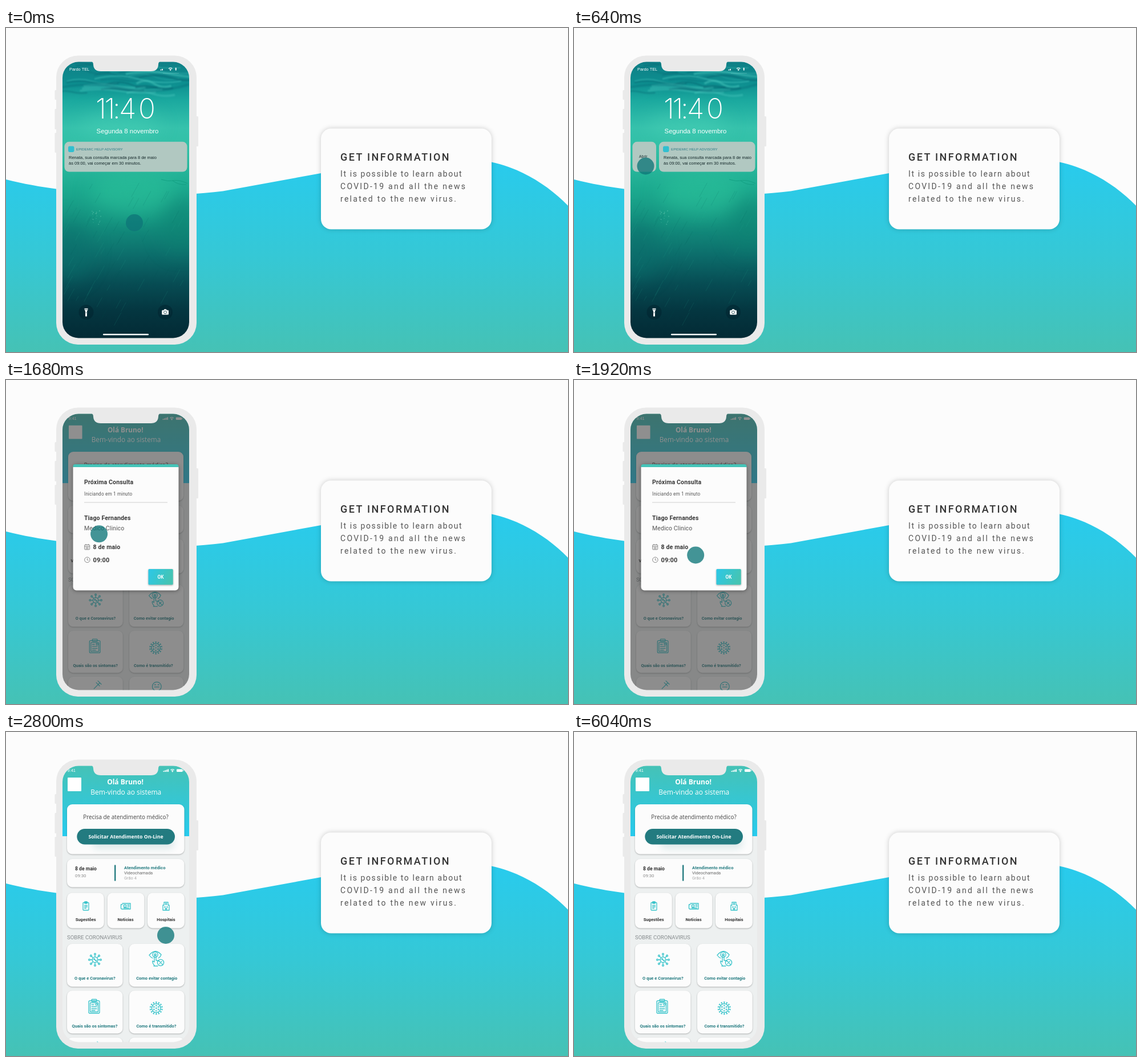
An HTML page that plays this animation: 985 by 569 pixels, repeating every 8080 ms.

```html
<!DOCTYPE html>
<html lang="pt">
<head>
<meta charset="utf-8">
<title>Get information</title>
<style>
  html, body { margin: 0; width: 100%; height: 100%; overflow: hidden; background: #fcfcfc; }
  svg { display: block; width: 985px; height: 569px; font-family: Roboto, sans-serif; }
  .ios { font-family: "Liberation Sans", Arial, sans-serif; }
  .open { font-family: "Open Sans", sans-serif; }
  .clock { font-family: Inter, sans-serif; font-weight: 200; }
  .mid { text-anchor: middle; }
  .b { font-weight: 700; }
  .m { font-weight: 500; }
  .card { fill: #fcfcfc; filter: drop-shadow(0 1px 1.2px rgba(0, 0, 0, .27)); }
  .icon { fill: none; stroke: #38c3ca; stroke-width: 1.3; stroke-linecap: round; stroke-linejoin: round; }
  .soft { filter: blur(1.3px); }
  .glow { filter: blur(16px); }
</style>
</head>
<body>
<svg id="stage" viewBox="0 0 985 569" xmlns="http://www.w3.org/2000/svg"></svg>
<script>
const LOOP = 8080, STEP = 40;
const TEAL = '#237b80';

const rect = (x, y, w, h, r, attrs = '') =>
  `<rect x="${x}" y="${y}" width="${w}" height="${h}" rx="${r}" ${attrs}/>`;
const circle = (x, y, r, attrs = '') => `<circle cx="${x}" cy="${y}" r="${r}" ${attrs}/>`;
const path = (d, attrs = '') => `<path d="${d}" ${attrs}/>`;
const text = (x, y, size, s, attrs = '') =>
  `<text x="${x}" y="${y}" font-size="${size}" ${attrs}>${s}</text>`;
const group = (body, attrs = '') => `<g ${attrs}>${body}</g>`;
const card = (x, y, w, h, r = 9) => rect(x, y, w, h, r, 'class="card"');
const many = (n, fn) => Array.from({ length: n }, (_, i) => fn(i)).join('');
const gradient = (id, dir, stops) =>
  `<linearGradient id="${id}" ${dir}>` +
  stops.map(([at, c]) => `<stop offset="${at}" stop-color="${c}"/>`).join('') + '</linearGradient>';
const DOWN = 'x1="0" y1="0" x2="0" y2="1"';

let seed = 11;
const rnd = () => (seed = seed * 16807 % 2147483647) / 2147483647;

const defs = `<defs>
  ${gradient('sea', 'gradientUnits="userSpaceOnUse" x1="0" y1="228" x2="0" y2="569"',
    [[0, '#28cbee'], [.5, '#35c8d6'], [1, '#45c2b5']])}
  ${gradient('head', 'gradientUnits="userSpaceOnUse" x1="0" y1="59" x2="0" y2="183"',
    [[0, '#45c2b6'], [1, '#27cbee']])}
  ${gradient('ok', 'x1="0" y1="0" x2="1" y2=".3"', [[0, '#2bc8e8'], [1, '#45c4b4']])}
  ${gradient('water', DOWN, [[0, '#0f7f86'], [.08, '#0d8f90'], [.14, '#1ba99f'], [.24, '#36c2ac'],
    [.33, '#2fbfa4'], [.46, '#1caa8f'], [.58, '#14927f'], [.7, '#0c6d6b'], [.8, '#074d54'],
    [.9, '#043640'], [1, '#032a35']])}
  <clipPath id="screen">${rect(99, 59.5, 222, 485, 28)}</clipPath>
</defs>`;

function wifi(x, y) {
  const arc = r => path(`M${x - r} ${y - r} A${r * 1.42} ${r * 1.42} 0 0 1 ${x + r} ${y - r}`);
  return group(arc(1.5) + arc(3.1), 'fill="none" stroke="#fff" stroke-width="1.2"') + circle(x, y - .4, .9, 'fill="#fff"');
}

const bars = (x, y, n) => many(n, i => rect(x + i * 2.6, y - 1.8 - i, 1.8, 1.8 + i, .4, 'fill="#fff"'));

function backdrop() {
  return rect(0, 0, 985, 569, 0, 'fill="#fcfcfc"') +
    path('M0 266 C60 281 120 288 200 293 C262 297 320 293 380 286.5 L552 255 ' +
      'C650 236 760 217 851 235.5 C905 247 952 278 985 312 V569 H0Z', 'fill="url(#sea)"') +
    rect(552, 176.5, 299, 177, 18,
      'fill="#fcfcfc" style="filter:drop-shadow(0 0 4px rgba(0,0,0,.2))"') +
    text(586, 233, 18, 'GET INFORMATION', 'class="m" fill="#333" letter-spacing="2.4"') +
    group(
      text(586, 261, 14, 'It is possible to learn about', 'letter-spacing="1.6"') +
      text(586, 283, 14, 'COVID-19 and all the news', 'letter-spacing="2.28"') +
      text(586, 304.5, 14, 'related to the new virus.', 'letter-spacing="2.28"'), 'fill="#555"');
}

const body = () => group(
  rect(85.5, 109, 5, 17, 1.5) + rect(85.5, 142, 5, 36, 1.5) + rect(85.5, 184, 5, 35, 1.5) +
  rect(332, 155, 5, 53, 1.5) + rect(88, 48.5, 246, 507.5, 38), 'fill="#eaeaea"');

const notch = () => path('M148 58 Q153 59 153 64 Q153.500 76 166 76 H254 Q266.500 76 267 64 Q267 59 272 58Z',
  'fill="#eaeaea"');

function wallpaper() {
  const ripples = many(26, i => {
    const y = 62 + i * 2.1, x = 90 + rnd() * 150, w = 50 + rnd() * 110, k = 3 + rnd() * 7;
    return path(`M${x} ${y} q${w * .25} ${-k} ${w * .5} 0 t${w * .5} ${k * .4}`,
      `stroke="${i % 2 ? '#45c4bb' : '#06636f'}" stroke-width="${1 + rnd() * 3}" opacity="${.25 + rnd() * .35}"`);
  });
  const rays = many(90, () => {
    const x = 95 + rnd() * 225, y = 270 + rnd() * 230, l = 8 + rnd() * 20;
    return path(`M${x} ${y} l${-l * .55} ${l}`, `stroke="${rnd() < .5 ? '#2fb59b' : '#06585a'}" opacity=".15"`);
  });
  const bubbles = many(16, () =>
    circle(150 + rnd() * 17, 315 + rnd() * 34, .5 + rnd() * .6, 'fill="#7fdcc4" opacity=".4"'));
  return rect(99, 59, 222, 486, 0, 'fill="url(#water)"') +
    group('<ellipse cx="225" cy="290" rx="75" ry="38" fill="#2cc39c" opacity=".55"/>' +
      '<ellipse cx="305" cy="345" rx="35" ry="50" fill="#0d8272" opacity=".5"/>' +
      '<ellipse cx="112" cy="390" rx="38" ry="55" fill="#0a6f6c" opacity=".5"/>' +
      '<ellipse cx="200" cy="170" rx="70" ry="24" fill="#4ed4ba" opacity=".4"/>', 'class="glow"') +
    group(ripples + path('M99 104 Q150 94 205 106 T321 99', 'stroke="#076f78" stroke-width="4" opacity=".4"'),
      'class="soft" fill="none"') +
    group(rays, 'fill="none"') + bubbles +
    path('M272 266 q12 4 22 2 t24 5 M292 268 q10 8 24 7', 'fill="none" stroke="#0f9a7c" opacity=".7"');
}

function lockScreen() {
  const torch = circle(140.5, 499, 13, 'fill="#021c26" opacity=".35"') +
    path('M137.500 492.500 h6 v2 l-1.500 3 v9 h-3 v-9 l-1.500 -3z', 'fill="#fff"') +
    path('M137.500 494.500 h6 M140.500 499 v2', 'stroke="#0a3a42" stroke-width=".7"');
  const camera = circle(279, 499, 13, 'fill="#021c26" opacity=".35"') +
    path('M274.500 495.500 h2 l1 -1.700 h3.200 l1 1.700 h2 q1.300 0 1.300 1.300 v5.500 q0 1.300 -1.300 1.300 h-9.200 ' +
      'q-1.300 0 -1.300 -1.300 v-5.500 q0 -1.300 1.300 -1.300z', 'fill="#fff"') +
    circle(279, 499.3, 2.5, 'fill="none" stroke="#0a3a42" stroke-width=".8"');
  const note = rect(109, 207.5, 10.5, 10.5, 2.4, 'fill="#31bfd0"') +
    text(123, 215, 6.25, 'EPIDEMIC HELP ADVISORY', 'fill="#2c7a85"') +
    group(text(110, 230.3, 7.5, 'Renata, sua consulta marcada para 8 de maio') +
      text(110, 240.3, 7.5, 'às 09:00, vai começar em 30 minutos.'), 'fill="#15282a"');
  return group(wallpaper() +
    text(111, 75, 7.4, 'Pardo TEL', 'fill="#fff"') +
    bars(270.5, 74.5, 2) + wifi(288.2, 74.6) + rect(296.8, 69.7, 1.8, 4.8, .6, 'fill="#fff"') +
    path('M275 79.500 H303', 'stroke="#7fd0cc" stroke-width=".6" opacity=".6"') +
    text('157 172.500 187 198 232', 158.5, 49.5, '11:40', 'class="clock" fill="#fff"') +
    text(213, 185, 11.4, 'Segunda 8 novembro', 'class="mid" fill="#fff"') +
    group(rect(102.5, 199.8, 0, 52.7, 8, 'id="tile"') + rect(102.5, 199.8, 215, 52.7, 8, 'id="note"'),
      'fill="#b1c8c1"') +
    text(121, 228.3, 6.8, 'Abrir', 'id="open" class="mid" fill="#1d3436"') +
    group(note, 'id="noteBody"') + torch + camera +
    rect(170, 537, 80, 2.6, 1.3, 'fill="#fff"'), 'id="lock" class="ios"');
}

function virus(x, y) {
  const spikes = many(8, i => group(
    path('M0 -5 V-8.500') + circle(0, -10, 1.4), `transform="rotate(${i * 45})"`));
  return group(spikes + circle(0, 0, 4.8) + circle(-1.3, -1, 1) + circle(1.5, 1.2, .8),
    `class="icon" transform="translate(${x} ${y})"`);
}

function germ(x, y) {
  const nubs = many(14, i => path('M0 -8.200 V-10.800 M-.8 -10.800 H.8', `transform="rotate(${i * 360 / 14})"`));
  const dots = many(7, i => circle(0, i ? -4.6 : 0, 1, `transform="rotate(${i * 60})"`));
  return group(nubs + circle(0, 0, 7.8) + group(dots, 'stroke-width="1"'),
    `class="icon" transform="translate(${x} ${y})"`);
}

const touchEye = () => group(
  path('M251 392 Q261 379 272 391 M252 393 Q254 396 257 397 M272 391 Q270 396 267 397') +
  circle(261.5, 391, 4.6) + circle(261.5, 391, 1.7) +
  path('M260 410 q-4 -5 -3 -8 l3 2 v-11 q1.500 -2 3 0 v8 l5 1 M259 411 h7') +
  circle(271, 405, 5.6) + path('M267.500 401.500 l7 7 M269 407 l4 -4'), 'class="icon" stroke-width="1.1"');

const board = () => group(
  rect(145, 472, 19, 22, 2) + rect(150, 469.5, 9, 4, 1) + rect(147.5, 475.5, 14, 16, .5) +
  path('M150 479 h4 M150 482.500 h9 M150 486 h9 M150 489 h6') + circle(158.5, 478.5, 1.6), 'class="icon" stroke-width="1.1"');

const menuIcons = () => group(
  rect(135, 299.5, 10, 13.5, 1) + rect(137.8, 298, 4.4, 3, .6, 'fill="#38c3ca"') + path('M137.500 304.500 h5 M137.500 307 h5 M137.500 309.500 h3') +
  path('M204 301 h14 v10 h-14.500 q-2 0 -2 -2 v-6 h2.500') + rect(206.5, 303.5, 4, 4, 0) +
  path('M213 303.500 h3 M213 306 h3 M206.500 309 h9') +
  path('M275 313 v-9 h2 v-5 h7 v5 h2 v9z M280.500 300.500 v3 M279 302 h3 M279.500 313 v-3 h2 v3') +
  path('M278 306.500 h1 M282 306.500 h1 M278 308.500 h1 M282 308.500 h1'), 'class="icon"');

// The lower part sits a little higher behind the dialog.
function home({ titleDy = 0, rowDy = 0, labelDx = 0 } = {}) {
  const bold = (x, y, size, s, fill = '#333') => text(x, y, size, s, `class="b mid" fill="${fill}"`);
  const rows = many(3, i => card(107, 372 + i * 82.3, 97.5, 75.2) + card(216, 372 + i * 82.3, 96.7, 75.2));
  const header = rect(90, 50, 240, 133, 0, 'fill="url(#head)"') +
    text(107.5, 69.5, 7.4, '9:41', 'class="ios" fill="#fff"') +
    bars(275.5, 70, 4) + wifi(291.7, 70) +
    rect(299, 65.3, 10.5, 4.8, 1.3, 'fill="#fff"') + rect(310, 66.8, .9, 2, .4, 'fill="#fff"') +
    rect(108, 80, 24, 24, 1, 'fill="#fff"') +
    group(text(209, 92, 12, 'Olá Bruno!', 'class="b"') +
      text(210.3, 109.6, 12, 'Bem-vindo ao sistema'), 'class="open mid" fill="#fff"');
  const ask = card(107, 127, 205.5, 87.5) +
    rect(150, 182, 146, 24, 12, `fill="${TEAL}" opacity=".13" style="filter:blur(6px)"`) +
    rect(124.3, 170, 171.7, 27.5, 13.7, `fill="${TEAL}"`) +
    group(text(210, 153.2, 9.9, 'Precisa de atendimento médico?', 'fill="#444"') +
      text(210, 186.6, 8.7, 'Solicitar Atendimento On-Line', 'class="b" fill="#fff"'), 'class="open mid"');
  const next = card(107, 223, 205.5, 49.5) +
    text(121, 243, 8.6, '8 de maio', 'class="b" fill="#333"') +
    text(121, 254.5, 7.8, '09:30', 'fill="#888"') +
    rect(190, 233.5, 2.4, 28, .5, `fill="${TEAL}"`) +
    text(207, 241, 7.6, 'Atendimento médico', `class="b" fill="${TEAL}" letter-spacing=".08"`) +
    text(207, 250, 7.5, 'Videochamada', 'fill="#666"') +
    text(207, 258.7, 7.5, 'Grão 4', 'fill="#aaa"');
  const menu = [107, 177.7, 248].map(x => card(x, 282.5, 64.8, 62)).join('') + menuIcons() +
    bold(139.7, 331.8, 7.6, 'Sugestões') + bold(209.5, 331.8, 7.6, 'Noticias') + bold(280.5, 331.8, 7.6, 'Hospitais');
  const topics = rows + virus(156, 400) + touchEye() + board() + germ(263.3, 485) +
    bold(155.8, 434.6, 7.5, 'O que e Coronavirus?', TEAL) +
    bold(264.2 + labelDx, 434.6, 7.5, 'Como evitar contagio', TEAL) +
    bold(155.5, 518.8, 7.5, 'Quais são os sintomas?', TEAL) +
    bold(263.5 + labelDx, 518.8, 7.5, 'Como é transmitido?', TEAL) +
    group(path('M153 558 l10 -10 M157 547 l6 6 M160 544 l6 6') + circle(265, 554, 8) +
      path('M261 551 h2 M267 551 h2 M261 555 h8'), 'class="icon"');
  return rect(90, 50, 240, 510, 0, 'fill="#edf0f0"') + header + ask + next + menu +
    group(text(107, 364, 9.6, 'SOBRE CORONAVIRUS', 'fill="#858a8c"'), `transform="translate(0 ${titleDy})"`) +
    group(topics, `transform="translate(0 ${rowDy})"`);
}

function dialog() {
  const calendar = rect(137.7, 289.3, 9, 8.5, 1) + path('M137.700 292 h9 M140 288 v2 M144.400 288 v2 M139.700 294 h5 M139.700 296 h5');
  const watch = circle(142.4, 315.8, 4.7) + path('M142.400 313 v3 l2 1');
  const bold = (x, y, s, size = 10.6) => text(x, y, size, s, 'class="b" fill="#3a3a3a" letter-spacing=".12"');
  return group(home({ titleDy: -4.6, rowDy: -7.7, labelDx: -4.5 }) +
      text(111.5, 324.5, 7.6, 'V', 'class="b" fill="#333"'),
      'transform="translate(3.8 1.2) scale(.983)"') +
    rect(90, 50, 240, 510, 0, 'fill="#383838" opacity=".56"') +
    rect(117.5, 148, 185, 221.5, 6, 'fill="#fcfcfc" style="filter:drop-shadow(0 1px 3px rgba(0,0,0,.4))"') +
    path('M117.500 153 v-1 q0 -4 4 -4 h177 q4 0 4 4 v1z', 'fill="#45c4b8"') +
    bold(137, 183, 'Próxima Consulta') +
    text(137, 203.4, 8.2, 'Iniciando em 1 minuto', 'fill="#555" letter-spacing=".16"') +
    path('M137 215 H283', 'stroke="#cfcfcf"') +
    bold(137, 245.6, 'Tiago Fernandes') +
    text(137, 263.5, 10.5, 'Medico Clinico', 'fill="#555" letter-spacing=".08"') +
    bold(152.5, 297, '8 de maio') + bold(152.5, 319.8, '09:00', 11) +
    group(calendar + watch, 'fill="none" stroke="#858585"') +
    rect(249.5, 332, 43.2, 27.5, 1.5, 'fill="url(#ok)" style="filter:drop-shadow(0 1px 1.5px rgba(0,0,0,.35))"') +
    text(271, 348.8, 8.2, 'OK', 'class="b mid" fill="#fff"');
}

const stage = document.getElementById('stage');
stage.innerHTML = defs + backdrop() + body() +
  group(lockScreen() + group(dialog(), 'id="dialog"') + group(home(), 'id="home"'), 'clip-path="url(#screen)"') +
  notch() + circle(0, 0, 15, 'id="touch" fill="#0e7678"');

const el = id => document.getElementById(id);
const parts = Object.fromEntries(
  ['lock', 'dialog', 'home', 'tile', 'note', 'open', 'noteBody', 'touch'].map(id => [id, el(id)]));
const ramp = (t, a, b) => Math.min(1, Math.max(0, (t - a) / (b - a)));
const mix = (a, b, p) => a + (b - a) * p;
const show = (node, on) => node.setAttribute('display', on ? 'inline' : 'none');

function draw(ms) {
  const t = Math.floor((ms % LOOP + .5) / STEP) * STEP;
  show(parts.lock, t < 1240);
  show(parts.dialog, t >= 1240 && t < 2800);
  show(parts.home, t >= 2800);

  const slide = ramp(t, 0, 640), left = 46.5 * slide;
  const tileW = Math.max(0, left - 5);
  parts.note.setAttribute('x', 102.5 + left);
  parts.note.setAttribute('width', 215 - left);
  parts.noteBody.setAttribute('transform', `translate(${47 * slide} 0)`);
  parts.tile.setAttribute('width', tileW);
  parts.open.setAttribute('x', 100.5 + tileW / 2);
  parts.open.setAttribute('opacity', ramp(slide, .4, 1));

  const go = ramp(t, 1500, 2240);
  const x = mix(mix(225, 125.5, slide), 280, go);
  const y = mix(mix(342, 242.5, slide), 357, go);
  parts.touch.setAttribute('transform', `translate(${x} ${y})`);
  parts.touch.setAttribute('opacity', .78 * (1 - ramp(t, 2880, 3280)));
}

const start = performance.now();
function tick() {
  draw(performance.now() - start);
  requestAnimationFrame(tick);
}
tick();
</script>
</body>
</html>
```
